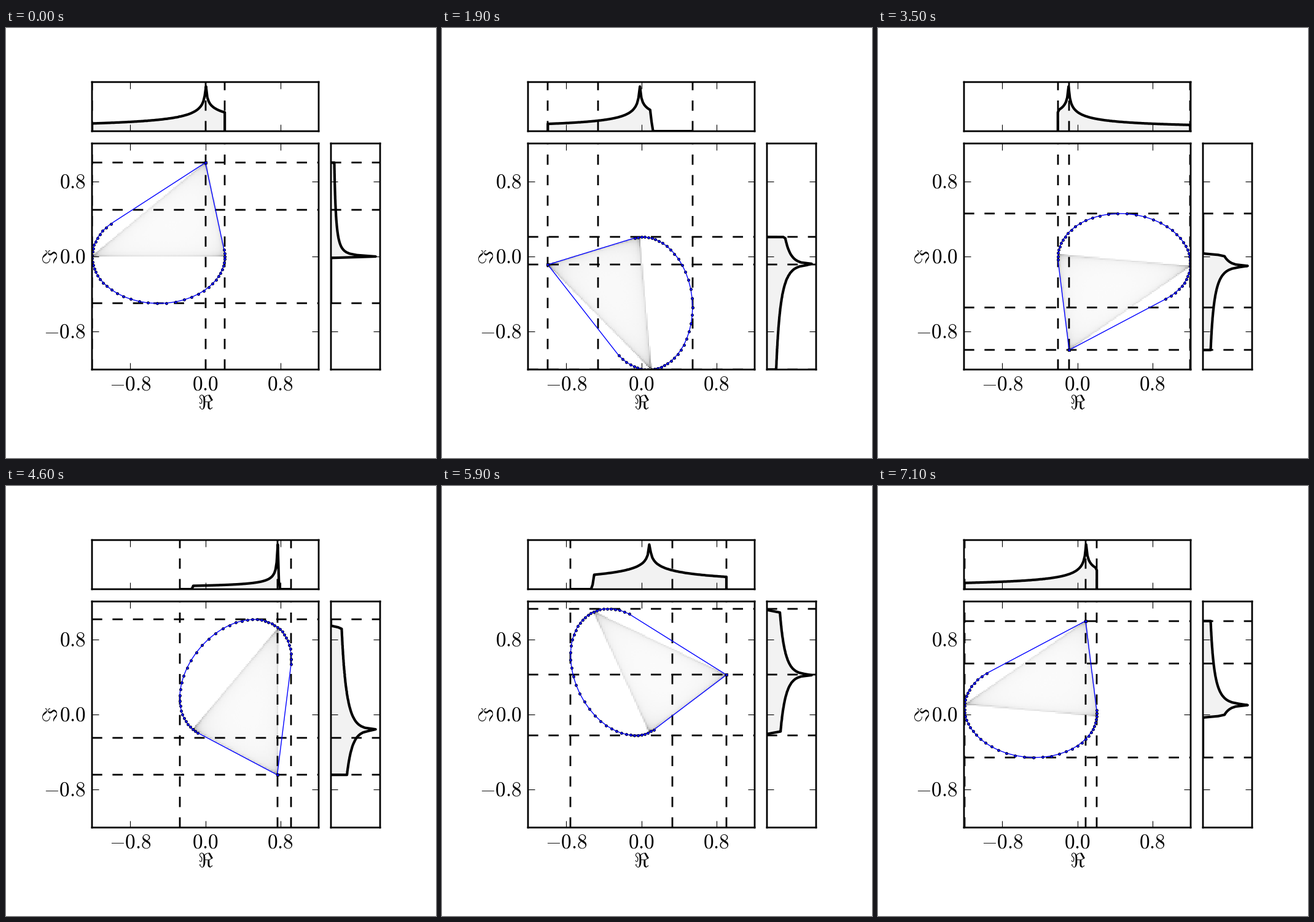
Recreate the animation shown at these times as a matplotlib script. Size 700 by 700 pixels, loop 7200 ms.

```python
import numpy as np
import matplotlib.pyplot as plt
from matplotlib.animation import FuncAnimation

plt.rcParams["mathtext.fontset"] = "cm"

SIZE = 700
FRAMES = 72
BINS = 100
LIM = (1 + np.sqrt(2)) / 2
TICKS = (-0.8, 0.0, 0.8)

# Layout in pixels, y measured from the bottom
LEFT, BOTTOM = 140, 144
WIDTH, HEIGHT, SIDE, GAP = 369, 368, 80, 20
MID_X, MID_Y = LEFT + WIDTH / 2, BOTTOM + HEIGHT / 2
UNIT = 152.8

MATRIX = np.array([[0, 1, 0], [0, -1, 0], [0, 0, 1j]])
DIRECTIONS = np.arange(0, 2 * np.pi, 0.1)


def shadow_samples(rows=900, cols=700):
    """Values of the quadratic form at real unit vectors, evenly spread."""
    rng = np.random.default_rng(1)
    u = (np.arange(rows)[:, None] + rng.random((rows, cols))) / rows
    phi = (np.arange(cols) + rng.random((rows, cols))) / cols * np.pi / 2
    rest = 1 - u**2
    lo, hi = -LIM, LIM - 1
    real = rest * (hi * np.cos(phi)**2 + lo * np.sin(phi)**2)
    return real.ravel(), (u**2).ravel()


def hermitian(m):
    return (m + np.conj(np.swapaxes(m, -1, -2))) / 2


def boundary(m):
    """Support points of the numerical range, one for each direction."""
    turned = np.exp(-1j * DIRECTIONS)[:, None, None] * m
    v = np.linalg.eigh(hermitian(turned))[1][:, :, -1]
    points = np.einsum("ki,ij,kj->k", v.conj(), m, v)
    return np.append(points, points[0])


def bin_index(values, lo, hi):
    index = ((values - lo) / (hi - lo) * BINS).astype(int)
    return np.clip(index, 0, BINS - 1)


def profile(lo, hi, counts):
    """Marginal scaled to a peak of one, dropping to zero at both ends."""
    pos = np.linspace(lo, hi, BINS)
    pos = np.concatenate([[lo], pos, [hi]])
    level = np.concatenate([[0], counts / counts.max(), [0]])
    return pos, level


def on_pixel(value, mid):
    """Nearest data value that falls on a whole pixel."""
    return (np.floor(mid + value * UNIT + 0.5) - mid) / UNIT


def make_axes(x, y, w, h, xlim, ylim, xticks, yticks):
    ax = fig.add_axes([x / SIZE, y / SIZE, w / SIZE, h / SIZE])
    ax.set(xlim=xlim, ylim=ylim, xticks=xticks, yticks=yticks)
    ax.tick_params(direction="in", length=8, width=0.8, top=True, right=True,
                   labelleft=False, labelbottom=False)
    for spine in ax.spines.values():
        spine.set(linewidth=2, snap=False)
    return ax


def label(x, y, text, **kw):
    fig.text(x / SIZE, y / SIZE, text, fontsize=24, va="baseline", **kw)


def dashed(draw):
    return [draw(0, color="k", lw=2, ls=(0, (6, 6)), dash_capstyle="butt",
                 snap=False) for _ in range(3)]


def area(ax):
    shade = ax.fill([0, 0, 0], [0, 0, 0], fc="0.95", ec="none", zorder=1)[0]
    curve, = ax.plot([], [], "k", lw=3, solid_capstyle="butt",
                     solid_joinstyle="round", zorder=1.5)
    return shade, curve


def set_area(parts, x, y):
    shade, curve = parts
    shade.set_xy(np.column_stack([x, y]))
    curve.set_data(x, y)


fig = plt.figure(figsize=(7, 7), dpi=100, facecolor="white")
xspan = (-WIDTH / 2 / UNIT, WIDTH / 2 / UNIT)
yspan = (-HEIGHT / 2 / UNIT, HEIGHT / 2 / UNIT)
rise = (0, 1.1)
main = make_axes(LEFT, BOTTOM, WIDTH, HEIGHT, xspan, yspan, TICKS, TICKS)
top = make_axes(LEFT, BOTTOM + HEIGHT + GAP, WIDTH, SIDE,
                xspan, rise, TICKS, [])
side = make_axes(LEFT + WIDTH + GAP, BOTTOM, SIDE, HEIGHT,
                 rise, yspan, [], TICKS)

for tick in TICKS:
    shift = tick * UNIT
    label(MID_X + shift, 110.3, f"${tick:.1f}$", ha="center")
    label(130, MID_Y + shift - 10.3, f"${tick:.1f}$", ha="right")
label(MID_X + 0.6, 80, r"$\Re$", ha="center")
label(83.5, MID_Y, r"$\Im$", ha="center", rotation=90,
      rotation_mode="anchor")

image = main.imshow(np.zeros((BINS, BINS)), cmap="gray_r", origin="lower",
                    aspect="auto", interpolation="nearest", zorder=0)
real_lines = [dashed(main.axvline), dashed(top.axvline)]
imag_lines = [dashed(main.axhline), dashed(side.axhline)]
outline, = main.plot([], [], "b.-", lw=1, ms=6, mec="k", mew=0.5, zorder=2.2)
top_area, side_area = area(top), area(side)
top.set(xlim=xspan, ylim=rise)
side.set(xlim=rise, ylim=yspan)

base_x, base_y = shadow_samples()


def update(frame):
    angle = 2 * np.pi * frame / FRAMES
    m = MATRIX * np.exp(1j * angle)
    real = np.linalg.eigvalsh(hermitian(m))
    imag = np.linalg.eigvalsh(hermitian(-1j * m))
    for group in real_lines:
        for line, value in zip(group, on_pixel(real, MID_X)):
            line.set_xdata([value, value])
    for group in imag_lines:
        for line, value in zip(group, on_pixel(imag, MID_Y)):
            line.set_ydata([value, value])

    points = boundary(m)
    outline.set_data(points.real, points.imag)

    c, s = np.cos(angle), np.sin(angle)
    x0, x1, y0, y1 = real[0], real[-1], imag[0], imag[-1]
    col = bin_index(c * base_x - s * base_y, x0, x1)
    row = bin_index(s * base_x + c * base_y, y0, y1)
    counts = np.bincount(row * BINS + col, minlength=BINS**2)
    counts = counts.reshape(BINS, BINS)
    image.set_data(counts)
    image.set_clim(0, counts.max())
    image.set_extent((x0, x1, y0, y1))
    main.set(xlim=xspan, ylim=yspan)

    pos, level = profile(x0, x1, counts.sum(axis=0))
    set_area(top_area, pos, level)
    pos, level = profile(y0, y1, counts.sum(axis=1))
    set_area(side_area, level, pos)
    return []


anim = FuncAnimation(fig, update, frames=FRAMES, interval=100, repeat=True,
                     repeat_delay=0, init_func=lambda: update(0))
plt.show()
```
